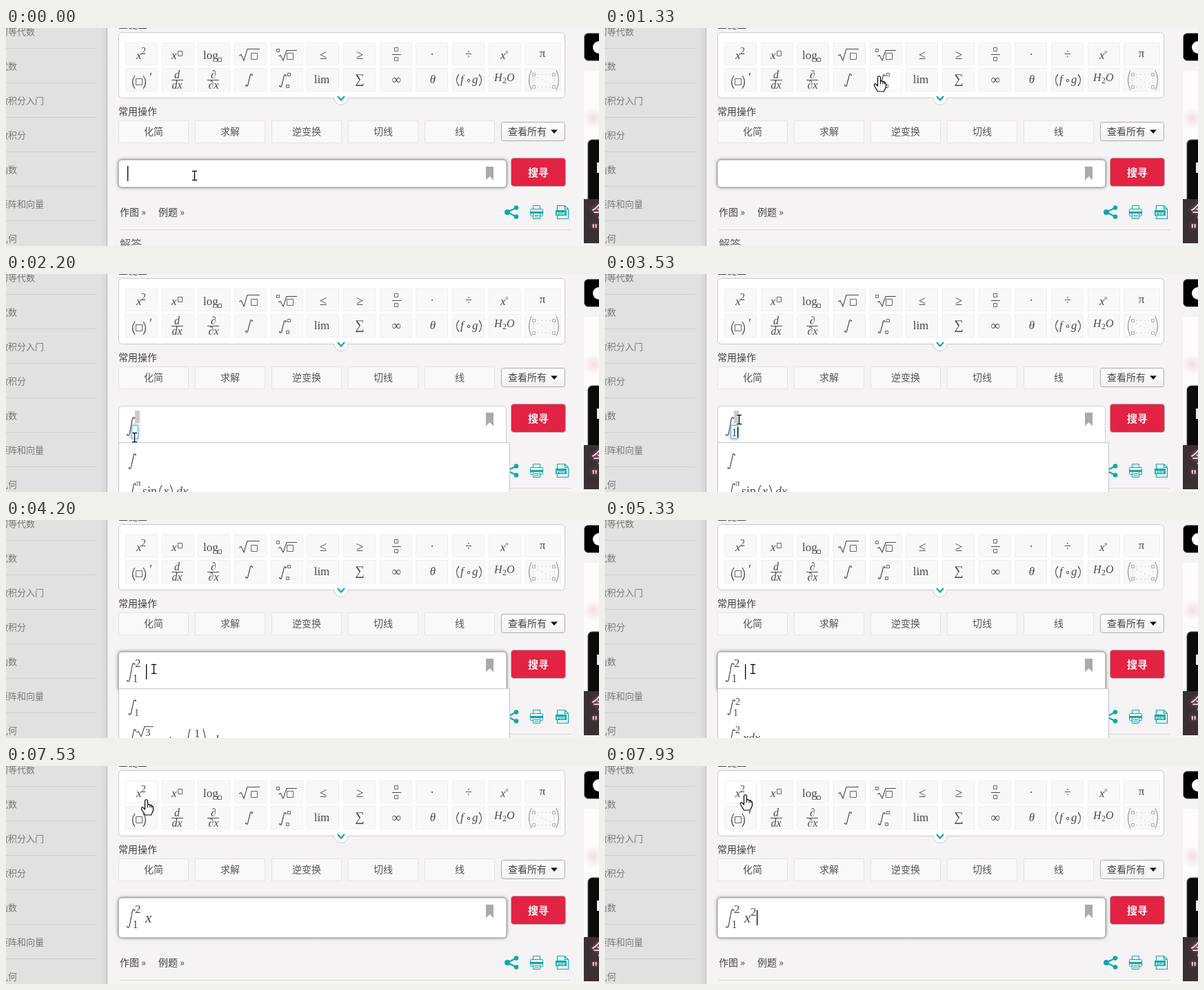
Recreate the animation shown at these times as an HTML page with a canvas. Size 860x316 px, loop 8000 ms.

```html
<!DOCTYPE html>
<html lang="zh">
<head>
<meta charset="utf-8">
<title>积分输入演示</title>
<style>
html, body { margin: 0; width: 860px; height: 316px; overflow: hidden; }
canvas { display: block; }
</style>
</head>
<body>
<canvas id="stage" width="860" height="316"></canvas>
<script>
const g = document.getElementById('stage').getContext('2d');
const LOOP = 8000, STEP = 1000 / 15;
const SANS = '"Noto Sans CJK SC", "Noto Sans CJK", sans-serif';
const SERIF = '"Liberation Serif", "DejaVu Serif", serif';
const INK = '#4a4a4a', TEAL = '#0aa9ab', BG = '#f5f3f4';

// ---------- helpers ----------
function rect(x, y, w, h, fill, line, r = 0) {
  g.beginPath();
  g.roundRect(x, y, w, h, r);
  if (fill) { g.fillStyle = fill; g.fill(); }
  if (line) { g.strokeStyle = line; g.lineWidth = 1; g.stroke(); }
}
function poly(points, color, width = 1) {
  g.beginPath();
  for (let i = 0; i < points.length; i += 2) g.lineTo(points[i], points[i + 1]);
  g.strokeStyle = color;
  g.lineWidth = width;
  g.stroke();
}
function dot(x, y, r, color) {
  g.beginPath();
  g.arc(x, y, r, 0, 7);
  g.fillStyle = color;
  g.fill();
}
function ring(x, y, r, color) {
  g.beginPath();
  g.arc(x, y, r, 0, 7);
  g.strokeStyle = color;
  g.lineWidth = 1;
  g.stroke();
}
function label(s, x, y, size = 14, color = '#555', align = 'left', weight = '') {
  g.font = `${weight} ${size}px ${SANS}`;
  g.textAlign = align;
  g.fillStyle = color;
  g.fillText(s, x, y);
}
function math(s, x, y, size = 17, style = '', align = 'left', color = INK) {
  g.font = `${style} ${size}px ${SERIF}`;
  g.textAlign = align;
  g.fillStyle = color;
  g.fillText(s, x, y);
}
const ital = (s, x, y, size = 17, align) => math(s, x, y, size, 'italic', align);
const slot = (x, y, w, h = w, color = '#666') => rect(x + .5, y + .5, w, h, null, color);
function paren(x, top, bottom, dir, color = INK) {
  g.beginPath();
  g.moveTo(x + dir * 4, top);
  g.quadraticCurveTo(x - dir * 3, (top + bottom) / 2, x + dir * 4, bottom);
  g.strokeStyle = color;
  g.lineWidth = 1.2;
  g.stroke();
}
function integral(x, y, w, h) {
  const m = x + w / 2;
  g.beginPath();
  g.moveTo(x + .5, y + h - 2);
  g.bezierCurveTo(x + w * .4, y + h + 2, m - 2, y + h * .8, m, y + h / 2);
  g.bezierCurveTo(m + 2, y + h * .2, x + w * .6, y - 2, x + w - .5, y + 2);
  g.strokeStyle = INK;
  g.lineWidth = 1.2;
  g.stroke();
  dot(x + 1, y + h - 2.2, .9, INK);
  dot(x + w - 1, y + 2.2, .9, INK);
}
const radical = (x, y, w, h) =>
  poly([x, y + h * .6, x + 3, y + h * .5, x + 7, y + h, x + 12, y + .5, x + w, y + .5], INK, 1.1);

// ---------- keypad ----------
const keyX = i => Math.round(173 + 52.65 * i);
const keys = [];
for (let i = 0; i < 24; i++) {
  const c = i % 12;
  keys.push([keyX(c), i < 12 ? 21 : 58, c === 11 ? 53 : 47, i < 12 ? 33 : 34]);
}
const ops = ['化简', '求解', '逆变换', '切线', '线'];
const opBoxes = ops.map((_, i) => [163 + 111 * i, 134, 102, 32]);
const inside = ([x, y, w, h], p) => p.x >= x && p.x < x + w && p.y >= y && p.y < y + h;

function keyFaces() {
  ital('x', 189, 45); math('2', 196, 38, 14);
  ital('x', 240, 45); slot(249, 33, 6, 7);
  math('log', 286, 45); slot(307, 43, 5);
  radical(338, 30, 30, 17); slot(355, 36, 9);
  slot(392, 30, 4); radical(395, 32, 27, 15); slot(407, 36, 9);
  math('≤', 460, 45, 19, '', 'center');
  math('≥', 513, 45, 19, '', 'center');
  slot(563, 28, 5); poly([560, 38.5, 573, 38.5], INK); slot(563, 42, 5);
  math('·', 618, 44, 17, '', 'center');
  math('÷', 671, 44, 18, '', 'center');
  ital('x', 717, 45); math('°', 724, 41, 12);
  math('π', 778, 42, 17, '', 'center');

  paren(183, 69, 88, 1); slot(188, 73, 9); paren(203, 69, 88, -1); math('′', 208, 78, 19);
  ital('d', 248, 73, 16, 'center'); poly([240, 75.5, 257, 75.5], INK); ital('dx', 248, 88, 16, 'center');
  ital('∂', 301, 73, 16, 'center'); poly([292, 75.5, 309, 75.5], INK); ital('∂x', 301, 88, 16, 'center');
  integral(347, 66, 11, 19);
  integral(396, 67, 11, 19); slot(408, 65, 4); slot(406, 82, 4);
  math('lim', 458, 80, 17, '', 'center');
  math('∑', 513, 80, 19, '', 'center');
  math('∞', 566, 81, 19, '', 'center');
  ital('θ', 619, 80, 17, 'center');
  paren(653, 67, 84, 1); ital('f', 659, 80); ring(671, 76, 1.8, INK); ital('g', 676, 80); paren(690, 67, 84, -1);
  ital('H', 708, 77, 16); math('2', 720, 80, 12); ital('O', 726, 77, 16);
  paren(758, 61, 90, 1, '#999'); paren(802, 61, 90, -1, '#999');
  for (const x of [763, 792]) for (const y of [65, 83]) slot(x, y, 4, 4, '#aaa');
  for (let k = 0; k < 4; k++) {
    const p = 771 + k * 6;
    dot(p, 67.5, .6, '#aaa'); dot(p, 85.5, .6, '#aaa'); dot(p, 72 + k * 3, .6, '#aaa');
    if (k < 3) { dot(765, 73 + k * 3, .6, '#aaa'); dot(795, 73 + k * 3, .6, '#aaa'); }
  }
}

function keypad(mouse) {
  label('全键盘', 163, 0, 14, '#444');
  rect(163.5, 6.5, 647, 95, '#fff', '#c9c9c9', 5);
  g.beginPath();
  g.arc(486, 101.5, 10, 0, Math.PI);
  g.fillStyle = '#fff'; g.fill();
  g.strokeStyle = '#ccc'; g.lineWidth = 1; g.stroke();
  rect(477, 98, 18, 5, '#fff');
  poly([481, 99, 486, 104.5, 491, 99], TEAL, 2.2);
  for (const k of keys) {
    const [x, y, w, h] = k;
    rect(x + .5, y + .5, w - 1, h - 1, inside(k, mouse) ? '#fff' : '#f8f8f8', '#efefef');
  }
  keyFaces();

  label('常用操作', 163, 126, 14, '#444');
  opBoxes.forEach((b, i) => {
    rect(b[0] + .5, 134.5, 101, 32, inside(b, mouse) ? '#fff' : '#f9f9f9', '#e4e4e4');
    label(ops[i], b[0] + 51, 155, 14, '#555', 'center');
  });
  const shade = g.createLinearGradient(0, 136, 0, 164);
  shade.addColorStop(0, '#fff');
  shade.addColorStop(1, '#f1f1f1');
  rect(718.5, 136.5, 92, 27, shade, '#aaa', 3);
  label('查看所有', 728, 155, 14, '#444');
  g.fillStyle = '#111';
  g.fill(new Path2D('M790 147.500h10l-5 5.500z'));
}

// ---------- page ----------
function sidebar() {
  const shade = g.createLinearGradient(136, 0, 147, 0);
  shade.addColorStop(0, '#e1e1e1');
  shade.addColorStop(1, '#d7d7d7');
  rect(0, 0, 147, 316, shade);
  rect(146, 0, 1, 316, '#b5b5b5');
  ['初等代数', '代数', '微积分入门', '微积分', '函数', '矩阵和向量', '几何'].forEach((s, i) => {
    label(s, -10, 10 + 50 * i, 13, '#777');
    rect(0, 29 + 50 * i, 131, 1, '#cecece');
  });
}

function advert() {
  rect(838.5, 7.5, 40, 40, '#000', '#999', 6);
  dot(860, 28, 9, '#fff');
  rect(838, 62, 22, 186, '#fdfbfc');
  const tint = g.createRadialGradient(852, 131, 1, 852, 131, 15);
  tint.addColorStop(0, '#f3dfe4');
  tint.addColorStop(1, '#fdfbfc');
  rect(838, 116, 22, 30, tint);
  rect(844, 162, 30, 100, '#0c0b0c', '#555', 6);
  rect(857, 195, 3, 15, '#eee');
  rect(838, 248, 22, 64, '#3a3034');
  g.shadowColor = '#f06a9a';
  g.shadowBlur = 4;
  label('今', 849, 273, 21, '#fbe8ef');
  label('"', 849, 300, 20, '#fbe8ef');
  g.shadowBlur = 0;
}

function links(dy) {
  g.save();
  g.translate(0, dy);
  label('作图 »', 165, 272, 14, '#444');
  label('例题 »', 221, 272, 14, '#444');
  poly([740, 260.5, 727, 267, 740, 273.5], TEAL, 2);
  dot(727, 267, 4, TEAL); dot(740, 260.5, 3.3, TEAL); dot(740, 273.5, 3.3, TEAL);
  // printer
  rect(764.5, 257.5, 10, 5, BG, TEAL);
  rect(760.5, 262.5, 18, 10, BG, TEAL, 1);
  rect(761, 266, 17, 3, TEAL);
  rect(764.5, 268.5, 10, 8, BG, TEAL);
  poly([766, 271.5, 773, 271.5], TEAL); poly([766, 274, 773, 274], TEAL);
  // pdf sheet
  g.strokeStyle = TEAL;
  g.lineWidth = 1.2;
  g.stroke(new Path2D('M799.500 264v-6.500h11l5 5v14h-16V272M810.500 257.500v5h5'));
  rect(797, 264, 16, 8, TEAL);
  math('PDF', 805, 271, 7, 'bold', 'center', '#fff');
  rect(165, 292, 654, 1, '#d9d7d8');
  label('解答', 165, 319, 16, '#666');
  g.restore();
}

// ---------- entry field ----------
function bound(x, y, w, h, focused) {
  if (focused) {
    g.shadowColor = '#6ab4e8';
    g.shadowBlur = 4;
    rect(x + .5, y + .5, w, h, '#fff', '#78afd8');
    g.shadowBlur = 0;
  } else rect(x, y, w, h, '#ccc');
}
const between = (t, a, b) => t >= a && t < b;

function field(t, grow) {
  const focused = t < 1470 || between(t, 4130, 7800) || t >= 7930;
  const h = (t < 1530 ? 40 : 58) + grow;
  if (focused) {
    g.shadowColor = 'rgba(0,0,0,.55)';
    g.shadowBlur = 5;
    rect(163, 191, 563, h, '#fff', null, 5);
    g.shadowBlur = 0;
    rect(163, 191, 563, h, '#fff', '#999', 5);
  } else rect(163.5, 191.5, 562, h - 1, '#fff', '#ccc', 5);
  g.fillStyle = '#aaa';
  g.fill(new Path2D('M696 201h11v19.500l-5.500-5.500-5.500 5.500z'));

  const caret = (x, y, h = 22) => rect(x, y, 1.3, h, '#000');
  if (t < 400 || between(t, 730, 1270)) caret(176, 200);
  if (t < 1530) return;
  integral(175, 207, 12.5, 28);
  if (t < 3670) {
    bound(187, 198, 7, 18, false);
    bound(182, 219, t < 3130 ? 9 : 10, 19, true);
    if (t >= 3130) caret(192, 222, 15);
  } else if (t < 4130) {
    bound(187, 195, 10, 19, true);
    if (t < 3870) caret(189, 198, 14);
  }
  if (t >= 3130) math('1', 183.500, 235, 16);
  if (t >= 3870) math('2', 187, 213, 17);
  if (between(t, 4130, 4800) || between(t, 5330, 5800)) caret(203, 209);
  if (t >= 6070) ital('x', 202, 227, 21);
  if (between(t, 6070, 6470) || between(t, 7000, 7530)) caret(211, 209);
  if (t >= 7870) {
    math('2', 211, 217, 17);
    caret(220, 209);
  }
}

function searchButton() {
  rect(732.5, 188.5, 79, 41, '#e32343', '#bfa9ad', 4);
  label('搜寻', 772, 215, 15, '#fff', 'center', 'bold');
}

function suggestions(t) {
  const first = between(t, 2130, 3670), second = between(t, 3930, 4330);
  if (!first && !second && !between(t, 4600, 6670)) return;
  rect(163.5, 244.5, 567, 90, '#fff', '#c4c4c4');
  integral(177.5, 260, 11.5, 23);
  integral(177.5, 303, 11.5, 25);
  if (first) {
    math('π', 189, 307, 13);
    math('sin', 198, 321, 18);
    paren(222, 306, 328, 1); ital('x', 228, 321, 18); paren(242, 306, 328, -1);
    ital('dx', 247, 321, 18);
    return;
  }
  math('1', 186, 284, 14);
  if (second) {
    radical(189, 299, 25, 15);
    math('3', 202, 313, 15);
    math('arctan', 214, 325, 18);
    paren(263, 303, 345, 1); math('1', 273, 315, 17); paren(290, 303, 345, -1);
    ital('dx', 299, 325, 18);
  } else {
    math('2', 189, 268, 14);
    math('2', 189, 309, 14);
    ital('xdx', 200, 322, 18);
  }
}

// ---------- pointer ----------
const path = [
  [0, 273, 214], [470, 273, 214], [530, 274, 214], [870, 274, 214], [1330, 397, 69],
  [1600, 397, 69], [2200, 186, 237], [2400, 186, 237], [2600, 188, 231], [3070, 188, 231],
  [3270, 193, 212], [3400, 193, 212], [3530, 194, 211], [3800, 194, 211], [4130, 214, 216],
  [7000, 214, 216], [7600, 203, 41], [LOOP, 203, 41]
];
function pointerAt(t) {
  const i = path.findIndex(p => p[0] > t);
  const [t0, x0, y0] = path[i - 1], [t1, x1, y1] = path[i];
  const u = (t - t0) / (t1 - t0), e = u * u * (3 - 2 * u);
  return { x: Math.round(x0 + (x1 - x0) * e), y: Math.round(y0 + (y1 - y0) * e) };
}
const hand = new Path2D('M-2 1.500Q0 -1 2 1.500V8Q4 6 5.500 8.500Q7.500 7.500 8 10Q10 9 10 12V16L7 22.500H-2L-7 14Q-7.500 11 -5 11.500L-2 14.500Z');
const arrow = new Path2D('M0 0V17l4-4 3 7 3-1-3-7h6z');

function pointer(p) {
  const { x, y } = p;
  if (y > 191) {
    g.lineCap = 'square';
    for (const [c, w] of [['rgba(255,255,255,.8)', 3], ['#000', 1.3]]) {
      poly([x + .5, y - 6, x + .5, y + 6], c, w);
      poly([x - 2.5, y - 6.5, x + 3.5, y - 6.5], c, w);
      poly([x - 2.5, y + 6.5, x + 3.5, y + 6.5], c, w);
    }
    g.lineCap = 'butt';
    return;
  }
  const shape = keys.concat(opBoxes).some(b => inside(b, p)) ? hand : arrow;
  g.save();
  g.translate(x + .5, y + .5);
  g.fillStyle = '#fff';
  g.fill(shape);
  g.strokeStyle = '#000';
  g.lineWidth = 1.2;
  g.lineJoin = 'round';
  g.stroke(shape);
  if (shape === hand) for (const k of [2, 5.5, 8]) poly([k, 8, k, 12], '#000', 1);
  g.restore();
}

// ---------- loop ----------
function draw(now) {
  const n = Math.floor((now % LOOP + 4) / STEP) % 120;
  const t = Math.round(n * STEP / 10) * 10;
  const mouse = pointerAt(t);
  const grow = between(t, 3670, 4130) ? 2 : 0;
  rect(0, 0, 860, 316, BG);
  sidebar();
  advert();
  keypad(mouse);
  links(t < 1530 ? 0 : 18 + grow);
  field(t, grow);
  searchButton();
  suggestions(t);
  pointer(mouse);
}
const start = performance.now();
function tick() {
  draw(performance.now() - start);
  requestAnimationFrame(tick);
}
tick();
</script>
</body>
</html>
```
